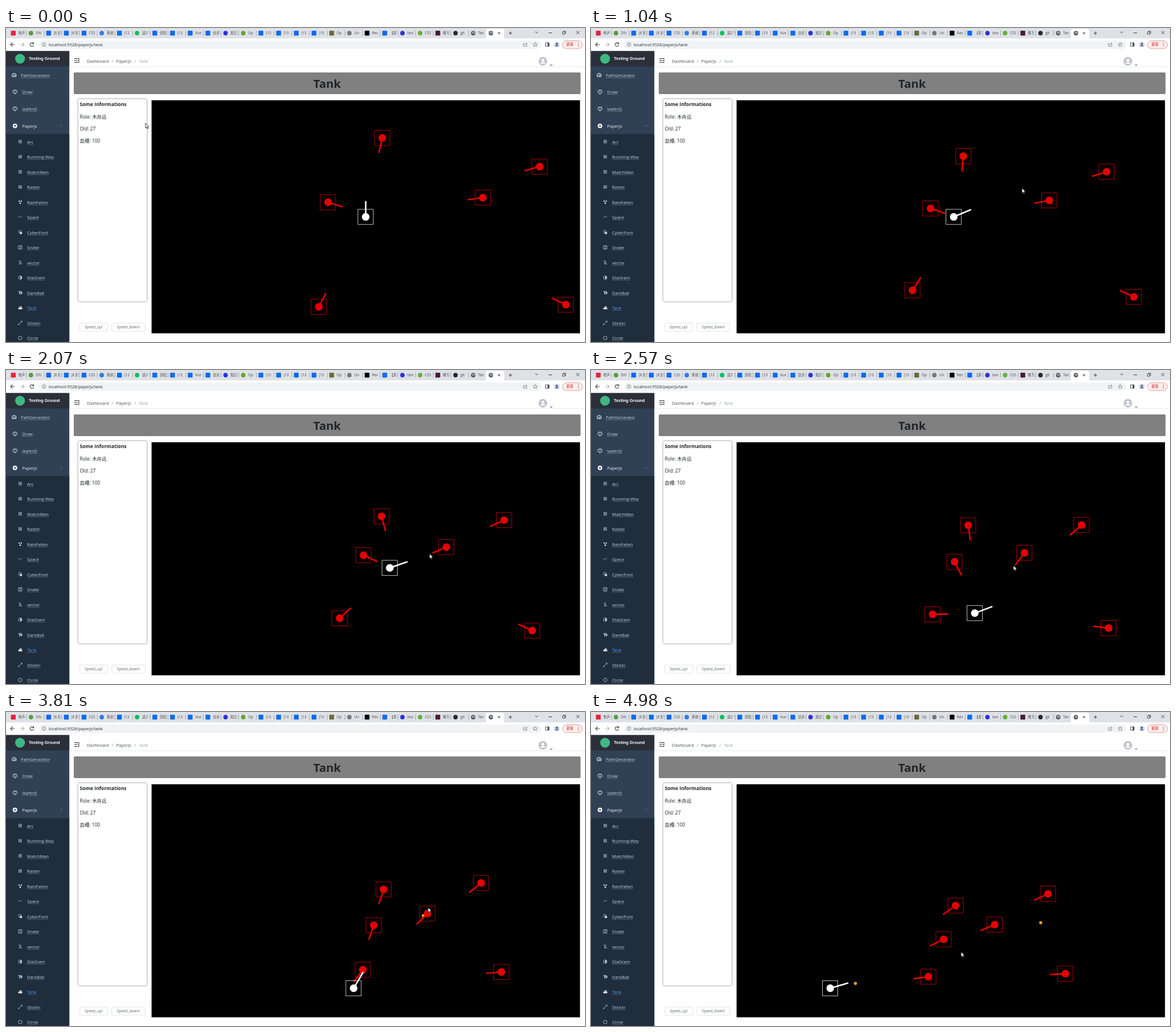
An HTML page with a canvas that plays this animation: 1017x551 px, repeating every 5.02 s.

```html
<!DOCTYPE html>
<html lang="zh">
<head>
<meta charset="utf-8">
<title>Tank</title>
<style>
html, body { margin: 0; width: 100%; height: 100%; overflow: hidden; background: #fff; }
body { position: relative; font-family: "Open Sans", "Noto Sans CJK SC", "Noto Sans CJK", sans-serif; }
canvas { position: absolute; left: 0; top: 0; }
span { position: absolute; line-height: 24px; white-space: pre; }
.mid { transform: translateX(-50%); }
.tab { width: 15px; overflow: hidden; -webkit-mask: linear-gradient(90deg, #000 60%, transparent); mask: linear-gradient(90deg, #000 60%, transparent); }
.link { text-decoration: underline .5px rgba(191, 210, 230, .3); text-underline-offset: 1px; }
.logo { font-family: "Liberation Sans", sans-serif; }
</style>
</head>
<body>
<canvas id="page" width="1017" height="551"></canvas>
<canvas id="game" width="1017" height="551"></canvas>
<script>
const LOOP = 5020, TICK = 1000 / 60, SCALE = 0.529;
const page = document.getElementById('page').getContext('2d');
const game = document.getElementById('game').getContext('2d');

// Drawing helpers
function rect(c, x, y, w, h, fill, r = 0) {
  c.fillStyle = fill;
  c.beginPath();
  c.roundRect(x, y, w, h, r);
  c.fill();
}
function disc(c, x, y, r, fill) {
  c.fillStyle = fill;
  c.beginPath();
  c.arc(x, y, r, 0, 7);
  c.fill();
}
function ring(c, x, y, r, color, width = 0.8) {
  c.strokeStyle = color;
  c.lineWidth = width;
  c.beginPath();
  c.arc(x, y, r, 0, 7);
  c.stroke();
}
function frame(c, x, y, w, h, color, width = 0.8, r = 0) {
  c.strokeStyle = color;
  c.lineWidth = width;
  c.beginPath();
  c.roundRect(x, y, w, h, r);
  c.stroke();
}
function path(x, y, d, color, width = 0.9) {
  page.save();
  page.translate(x, y);
  page.strokeStyle = color;
  page.lineWidth = width;
  page.stroke(new Path2D(d));
  page.restore();
}
function label(x, y, text, size, color, cls = '', weight = 400) {
  const s = document.createElement('span');
  s.textContent = text;
  s.className = cls;
  s.style.cssText = `left:${x}px;top:${y - 12}px;font-size:${size}px;color:${color};font-weight:${weight}`;
  document.body.append(s);
}
function person(x, y, r, back, front) {
  disc(page, x, y, r, back);
  disc(page, x, y - r * 0.25, r * 0.34, front);
  page.beginPath();
  page.ellipse(x, y + r * 0.55, r * 0.58, r * 0.38, 0, Math.PI, 0);
  page.fill();
}

function drawTabs() {
  const names = ('有声,DN,(8 封,(8 封,CSS,系统,(12,这2个,剑指,(13,Vue,业余,知识,Op,(13,(13,(13,(13,' +
    'Op,Un,Rev,【原,box,CSS,堆写,git,Tan').split(',');
  const marks = {
    0: '#e3263c', 1: '#539e43', 5: '#2f7de1', 7: '#07c160', 12: '#2932e1', 13: '#63a52f', 18: '#6d6a3c',
    19: '#777', 20: '#000', 22: '#2932e1', 23: '#5fb336', 24: '#4a1838', 25: '#24292f'
  };
  const square = [0, 18, 20, 24];
  rect(page, 0, 0, 1017, 18.5, '#dee1e6');
  rect(page, 843, 1.5, 32, 20, '#fff', 4);
  for (let i = 0; i < 28; i++) {
    const x = 12.8 + 31.07 * i;
    if (i > 25) {
      disc(page, x, 9, 3.9, '#50545a');
      path(x, 9, 'M-2.6-1 L-.5-2 L.2-.2 L-1 1.8 M1-2.6 L2.8-.6 L1.2 1.2', '#e8eaed', 1);
    } else if (marks[i] && !square.includes(i)) disc(page, x, 9, 3.9, marks[i]);
    else rect(page, x - 4.2, 4.8, 8.4, 8.4, marks[i] || '#0b6cf0', 1);
    if (i < 26) rect(page, x + 22.8, 4.5, 0.7, 9, '#8d9197');
    if (names[i]) label(x + 8.6, 9, names[i], 6.4, '#45484d', 'tab');
  }
  path(866, 9, 'M-2-2 L2 2 M2-2 L-2 2', '#333');
  path(886, 9, 'M-3 0 H3 M0-3 V3', '#333');
  path(932, 7.5, 'M-2.5-1.3 L0 1.3 L2.5-1.3', '#333');
  path(956, 8.5, 'M-3 0 H3', '#222');
  path(980, 8, 'M-2.5-1 H1.5 V3 H-2.5 Z M-1-1 V-2.5 H3 V1.5 H1.5', '#222', 0.7);
  path(1004.5, 8, 'M-2.7-2.7 L2.7 2.7 M2.7-2.7 L-2.7 2.7', '#222', 0.8);
}

function drawToolbar() {
  rect(page, 0, 18.5, 1017, 22, '#fff');
  rect(page, 58, 22, 882, 14.5, '#f1f3f4', 7.2);
  path(11.5, 29, 'M4 0 H-3.5 M0-3.5 L-3.5 0 L0 3.5', '#45494d', 1.1);
  path(28.5, 29, 'M-4 0 H3.5 M0-3.5 L3.5 0 L0 3.5', '#b4b7ba', 1.1);
  path(45.5, 29, 'M2.8-1.6 A3.2 3.2 0 1 0 3.1 1 M3.2-3.8 V-1.2 H.6', '#45494d', 1.1);
  ring(page, 66.7, 29, 3.2, '#5f6368', 0.7);
  path(66.7, 29, 'M0-1.8 V-1 M0-.4 V1.8', '#5f6368', 0.8);
  label(75, 29, 'localhost:9528/paperjs/tank', 7.3, '#2b2d30');
  path(912, 29, 'M-1-2 H-3 V3 H3 V1 M-1 1 Q-.5-1.5 3-1.5 M1-3.5 L3.2-1.5 L1 .5', '#5f6368', 0.7);
  path(929.5, 29, 'M0-3.8 L1.1-1.2 L3.8-1 L1.8 .8 L2.4 3.4 L0 2 L-2.4 3.4 L-1.8 .8 L-3.8-1 L-1.1-1.2 Z', '#5f6368', 0.7);
  frame(page, 947.5, 26, 6.5, 6, '#45494d', 0.9);
  rect(page, 951.3, 26, 2.7, 6, '#45494d');
  person(967.5, 29, 5.2, '#d3dcf0', '#3b4a6b');
  rect(page, 977.5, 22.5, 35, 13.5, '#fdf0ef', 6.8);
  frame(page, 977.5, 22.5, 35, 13.5, '#d9847d', 0.8, 6.8);
  label(984, 29, '更新', 6.5, '#c5221f', '', 500);
  for (const y of [26.3, 29, 31.7]) disc(page, 1005.5, y, 0.75, '#b3261e');
}

function drawSidebar() {
  const ink = '#c2d3e6';
  rect(page, 0, 40.5, 111.2, 511, '#304156');
  rect(page, 0, 40.5, 111.2, 27, '#2b2f3a');
  rect(page, 0, 186, 111.2, 365, '#1f2d3d');
  disc(page, 24.7, 53.8, 8.6, '#3fb883');
  label(40, 54, 'Testing Ground', 7.4, '#fff', 'logo', 700);

  path(14.3, 83, 'M-3 2.4 A3.6 3.6 0 1 1 3 2.4 Z M0 1.5 L1.3-1.3 M-2 .4 H-1.3 M-1.2-1.8 L-.9-1.2 M1.3 .4 H2.2', ink, 1.1);
  for (const y of [112.3, 141.9])
    path(15.8, y, 'M-3.7 1.4 V-2 H3.7 V1.4 Z M-2.3-2 V-3.6 H2.3 V-2 M-1 1.4 V3.6 H1 V1.4', ink, 0.8);
  disc(page, 15.8, 171.7, 4, '#f4f4f5');
  path(15.8, 171.7, 'M-2 0 H2 M0-2 V2', '#304156', 1.1);
  path(97.3, 171.5, 'M-2 1 L0-1 L2 1', '#8d98a5', 0.6);
  label(26, 82.7, 'PathGenarator', 7.5, ink, 'link');
  label(28.5, 112.3, 'Draw', 7.5, ink, 'link');
  label(28.5, 141.9, 'leaferJS', 7.5, ink, 'link');
  label(28.5, 171.5, 'PaperJs', 7.5, '#f4f4f5');

  const items = 'Arc,Running-Way,MatchMan,Raster,RainFallen,Space,CyberFont,Snake,vector,DiaGram,DarkBall,Tank,StickIn,Circle';
  const icons = {
    5: 'M-3 1 L-1-1 L0 0 M1-1 H3', 7: 'M-3-3 H3 V3 H-3 Z M-1.5 1.8 H0 V-1.8 H1.6',
    8: 'M-3-2.5 H1 L-2 2.5 H3.2 M0 0 L2 1', 12: 'M-3 3 L3-3 M1-3.2 H3.2 V-1 M-3.2 1.5 V3.2 H-1.5'
  };
  items.split(',').forEach((name, i) => {
    const y = 199.5 + 26.5 * i, x = 25;
    label(37, y, name, 7.65, name === 'Tank' ? '#409eff' : ink, 'link');
    if (i < 4) {
      for (let k = 0; k < 9; k++) rect(page, x - 3 + (k % 3) * 2.1, y - 3 + (k / 3 | 0) * 2.1, 1.6, 1.6, '#a3afbd');
    } else if (icons[i]) path(x, y, icons[i], ink, 0.8);
    else if (i === 4) {
      disc(page, x - 1.8, y - 1.7, 1.3, ink);
      disc(page, x + 1.8, y - 1.7, 1.3, ink);
      disc(page, x, y + 1.7, 1.5, ink);
    } else if (i === 6) {
      ring(page, x - 0.6, y - 1, 2.4, ink);
      disc(page, x + 1.2, y + 1.3, 2.2, ink);
    } else if (i === 9) {
      ring(page, x, y, 3.1, ink);
      path(x, y, 'M1-2.4 V2.4', ink, 2.4);
    } else if (i === 10) {
      path(x, y, 'M-2.6-2.6 L0 .4 L-1 3 M.5-2.8 L3 0 L2 2.6', ink, 1.7);
    } else if (i === 11) {
      rect(page, x - 3.5, y - 0.4, 7.2, 3.2, '#d7e0ea', 1.4);
      rect(page, x - 1.2, y - 2.4, 3.8, 1.7, '#d7e0ea', 0.5);
    } else ring(page, x, y, 3.2, ink);
  });
}

function drawContent() {
  rect(page, 111.2, 67.6, 906, 0.8, '#e6e8eb');
  path(120, 57, 'M0-3.3 H9 M0 0 H5 M0 3.3 H9 M9-1.6 L6.6 0 L9 1.6', '#222', 1);
  label(142, 58.3, 'Dashboard', 7.5, '#4a4d52');
  label(185.7, 58.3, '/', 7.5, '#8a8f98');
  label(193.8, 58.3, 'PaperJs', 7.5, '#4a4d52');
  label(225.5, 58.3, '/', 7.5, '#8a8f98');
  label(233.3, 58.3, 'Tank', 7.5, '#97a0ab');
  person(943, 58.4, 7.6, '#c0c4cc', '#fff');
  path(957.5, 65, 'M-2-.4 H2 L0 1.3 Z', '#444', 0.6);

  rect(page, 119, 78, 890.2, 38, '#808080', 2);
  label(564, 96.5, 'Tank', 20.4, '#212529', 'mid', 700);

  page.save();
  page.shadowColor = 'rgba(0,0,0,.65)';
  page.shadowBlur = 3;
  rect(page, 127, 124.8, 120.3, 355, '#fff', 2);
  page.restore();
  label(129.5, 134, 'Some Informations', 8.6, '#212529', '', 700);
  label(129.5, 155.5, 'Role: 木舟远', 8.46, '#212529');
  label(129.5, 176.5, 'Old: 27', 8.46, '#212529');
  label(129.5, 197.7, '血槽: 100', 8.46, '#212529');
  frame(page, 129.7, 517.7, 48.8, 14.4, '#d4d8de', 0.7, 1.5);
  frame(page, 186, 517.7, 58, 14.4, '#d4d8de', 0.7, 1.5);
  label(154, 525, 'Speed_up!', 6.5, '#606266', 'mid');
  label(215, 525, 'Speed_down!', 6.5, '#606266', 'mid');
  rect(page, 255.7, 126.7, 752.5, 409, '#000');
}

// Key presses: first step, start of auto-repeat, repeat count, direction
const STEP = 10 * SCALE, REPEAT = 33.15;
const keys = [[750, 1250, 7, 1, 0], [1485, 2015, 28, 0, 1], [2945, 3450, 99, -1, 0]];
function player(t) {
  let x = 631.8, y = 331.4;
  for (const [press, start, count, dx, dy] of keys) {
    if (t < press) continue;
    const n = 1 + Math.min(count, Math.max(0, Math.floor((t - start) / REPEAT) + 1));
    x += dx * n * STEP;
    y += dy * n * STEP;
  }
  return { x, y };
}

// Mouse stops: time, x, y
const stops = [
  [0, 245, 167], [250, 245, 167], [900, 757, 281], [1200, 757, 281], [1330, 747, 292], [1880, 747, 292],
  [2200, 742, 343], [3250, 742, 343], [3290, 741, 343], [3450, 741, 343], [3500, 742, 343], [3900, 741, 343],
  [4150, 710, 343], [4210, 639, 340], [4360, 657, 426], [4420, 650, 421], [4880, 649, 421], [4910, 650, 421],
  [LOOP, 650, 421]
];
function mouse(t) {
  let i = 0;
  while (i < stops.length - 2 && t >= stops[i + 1][0]) i++;
  const [t0, x0, y0] = stops[i], [t1, x1, y1] = stops[i + 1];
  const k = (t - t0) / (t1 - t0);
  const moving = Math.hypot(x1 - x0, y1 - y0) > 1.5;
  return { x: x0 + (x1 - x0) * k, y: y0 + (y1 - y0) * k, last: moving ? t : t0 };
}

// The gun turns only while the mouse moves over the field
function gun(t) {
  const at = mouse(Math.max(0, t - 30)).last, m = mouse(at);
  if (m.x < 256) return { x: 0, y: -26.5 };
  const p = player(at), a = Math.atan2(m.y - p.y, m.x - p.x);
  return { x: 32 * Math.cos(a), y: 32 * Math.sin(a) };
}

// Middle of a tank's bounds, gun included
const HALF = 13.3, BARREL = 26;
const polar = (r, a) => ({ x: r * Math.cos(a), y: r * Math.sin(a) });
function middle(p, g) {
  const mid = v => (Math.max(HALF, v) + Math.min(-HALF, v)) / 2;
  return { x: p.x + mid(g.x), y: p.y + mid(g.y) };
}

// Foes turn from their own middle towards the player's and drive that way
function turn(foe, goal) {
  const m = middle(foe, polar(BARREL, foe.a));
  return Math.atan2(goal.y - m.y, goal.x - m.x);
}
function chase() {
  const start = [[661, 193], [937.4, 243.3], [837.6, 297.7], [565.6, 305.8], [549.5, 489.3], [983.5, 485.5]];
  const first = middle(player(0), gun(0));
  let foes = start.map(([x, y]) => {
    const foe = { x, y, a: Math.atan2(first.y - y, first.x - x) };
    return { x, y, a: turn(foe, first) };
  });
  const track = [];
  for (let t = 0; t <= LOOP; t += TICK) {
    const goal = middle(player(t), gun(t));
    track.push(foes);
    foes = foes.map(foe => {
      const a = turn(foe, goal), d = polar(SCALE, a);
      return { x: foe.x + d.x, y: foe.y + d.y, a };
    });
  }
  return track;
}
const track = chase();

// Shots: fired at, then a point on the path and its time
const SPEED = 15 * SCALE / TICK;
const shots = [[3497, 4210, 829, 193.5], [4356, 4980, 789.5, 370], [4912, 4980, 464, 476.3]];

function tank(p, g, color) {
  frame(game, p.x - HALF, p.y - HALF, 2 * HALF, 2 * HALF, color, 0.75);
  disc(game, p.x, p.y, 6.7, color);
  game.strokeStyle = color;
  game.lineWidth = 2.6;
  game.lineCap = 'round';
  game.beginPath();
  game.moveTo(p.x, p.y);
  game.lineTo(p.x + g.x, p.y + g.y);
  game.stroke();
}
function pointer({ x, y }) {
  game.save();
  game.translate(x, y);
  const arrow = new Path2D('M0 0 V8.6 L2 6.8 L3.4 9.9 L4.8 9.3 L3.4 6.3 H6.1 Z');
  game.lineWidth = 0.8;
  game.fillStyle = '#fff';
  game.strokeStyle = '#111';
  game.fill(arrow);
  game.stroke(arrow);
  game.restore();
}

function draw(t) {
  game.clearRect(0, 0, 1017, 551);
  game.save();
  game.beginPath();
  game.rect(256, 127, 752, 408.5);
  game.clip();
  for (const [fired, when, x, y] of shots) {
    if (t < fired) continue;
    const p = player(fired), d = polar(SPEED * (t - when), Math.atan2(y - p.y, x - p.x));
    disc(game, x + d.x, y + d.y, 2.7, '#f0a020');
  }
  const foes = track[Math.min(track.length - 1, Math.floor(t / TICK))];
  for (const foe of foes) tank(foe, polar(BARREL, foe.a), '#e60000');
  tank(player(t), gun(t), '#fff');
  game.restore();
  pointer(mouse(t));
}

drawTabs();
drawToolbar();
drawSidebar();
drawContent();
const begin = performance.now();
function loop() {
  draw((performance.now() - begin) % LOOP);
  requestAnimationFrame(loop);
}
loop();
</script>
</body>
</html>
```
